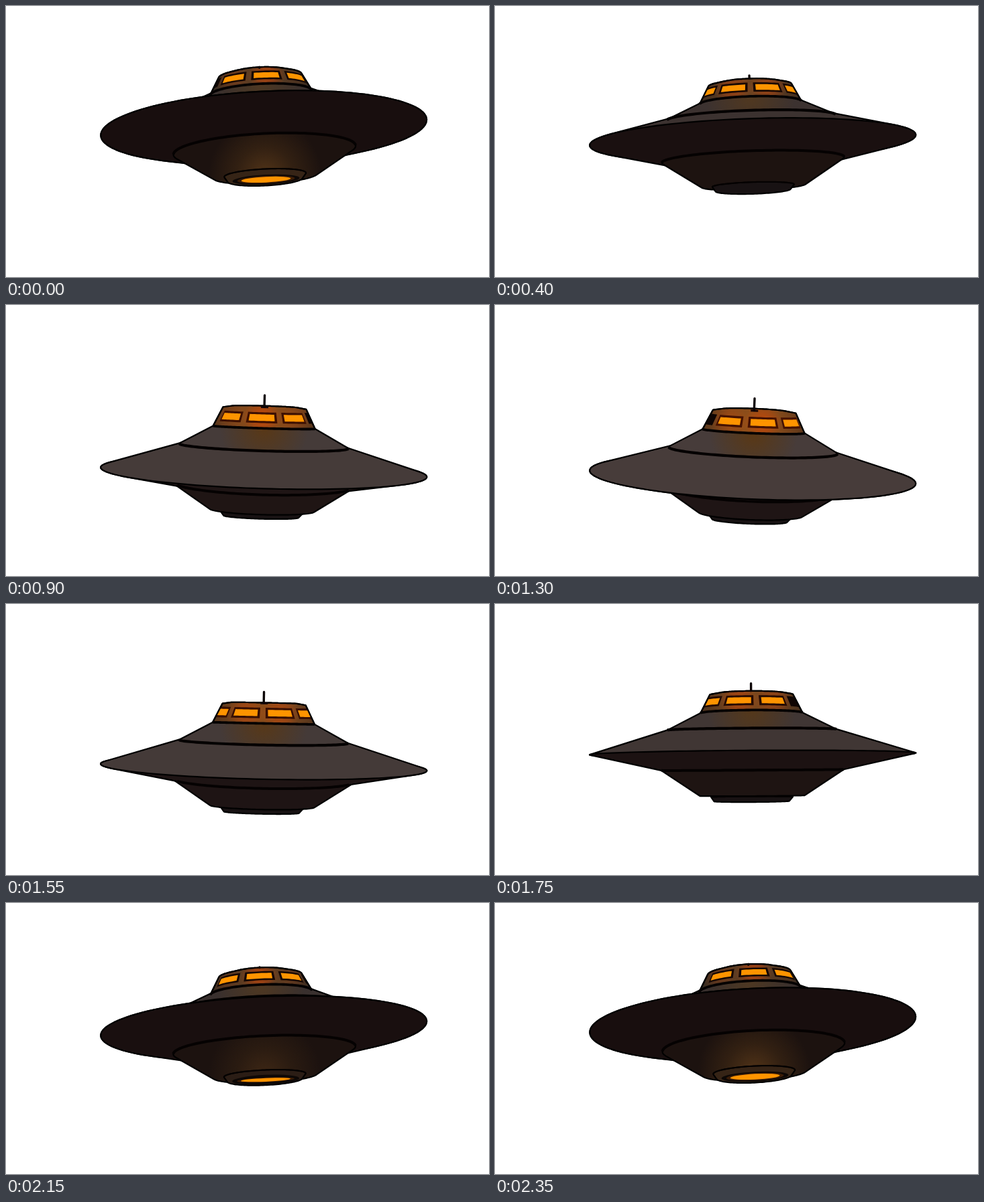
Animation of 720x405 px, one loop 2400 ms. Source, as an HTML page with a canvas:

```html
<!DOCTYPE html>
<html lang="en">
<head>
<meta charset="utf-8">
<title>Flying saucer</title>
<style>
html, body { margin: 0; width: 100%; height: 100%; overflow: hidden; background: #fff; }
canvas { display: block; width: 720px; height: 405px; }
</style>
</head>
<body>
<canvas id="stage" width="720" height="405"></canvas>
<script>
const ctx = document.getElementById('stage').getContext('2d');
const LOOP = 2400, STEP = 50, LEAD = 15, RAD = Math.PI / 180;
const SPACING = 45;

// radius, height and its change, depth (near side, down) and its change, x shift
const RINGS = {
  cap:        [49, 79.5, 20.5, -11, 14, -1.5],
  domeTop:    [62, 77, 21, -12, 15, -1.5],
  domeBase:   [76, 51.5, 17.5, -14, 17.5, -1.5],
  shoulder:   [126, 31.5, 8.5, -18, 28.5, -1],
  rim:        [243.2, 0, 0, -54, 88.5, 0],
  hull:       [136, -34, 18, -25, 46, -.5],
  hullBase:   [78, -72, 17, -12, 21, -1],
  flange:     [61, -71, 12, -9, 15, -1.5],
  flangeBase: [56, -78, 13, -9, 14, -2]
};

const mix = (a, b, k) => 'rgb(' + a.map((v, i) => Math.round(v + (b[i] - v) * k)) + ')';

// 0 = seen from below, 1 = seen from above
function swing(t) {
  const u = -Math.cos(2 * Math.PI * (t + LEAD) / LOOP);
  return .5 + .5 * (u + .12 * (u - u ** 3));
}

function ringsAt(s) {
  const out = {};
  for (const name in RINGS) {
    const [r, h, dh, b, db, x] = RINGS[name];
    out[name] = { r, x, y: -h - dh * s, b: b + db * s };
  }
  return out;
}

const at = (ring, a) => [ring.x + ring.r * Math.sin(a), ring.y + ring.b * Math.cos(a)];

function blend(p, q, v) {
  const o = {};
  for (const k in p) o[k] = p[k] + (q[k] - p[k]) * v;
  return o;
}

function arcPoints(ring, from, to, n) {
  return Array.from({ length: n + 1 }, (_, i) => at(ring, (from + (to - from) * i / n) * RAD));
}

function convex(pts) {
  pts.sort((p, q) => p[0] - q[0] || p[1] - q[1]);
  const half = list => {
    const h = [];
    for (const p of list) {
      while (h.length > 1) {
        const a = h[h.length - 2], b = h[h.length - 1];
        if ((b[0] - a[0]) * (p[1] - a[1]) - (b[1] - a[1]) * (p[0] - a[0]) > 0) break;
        h.pop();
      }
      h.push(p);
    }
    return h.slice(0, -1);
  };
  return [...half(pts), ...half(pts.slice().reverse())];
}

function trace(pts, closed) {
  ctx.beginPath();
  pts.forEach(p => ctx.lineTo(p[0], p[1]));
  if (closed) ctx.closePath();
}

function outline() {
  ctx.strokeStyle = '#000';
  ctx.lineWidth = 2.2;
  ctx.stroke();
}

function solid(fill, ...rings) {
  const pts = convex(rings.flatMap(r => arcPoints(r, 0, 360, 120)));
  trace(pts, true);
  ctx.fillStyle = fill;
  ctx.fill();
  outline();
  return pts;
}

function nearLine(ring, width, reach = 88) {
  trace(arcPoints(ring, -reach, reach, 60));
  ctx.strokeStyle = '#050202';
  ctx.lineWidth = width;
  ctx.stroke();
}

function radial(x, y, r, ...stops) {
  const g = ctx.createRadialGradient(x, y, 0, x, y, r);
  stops.forEach((c, i) => g.addColorStop(i / (stops.length - 1), c));
  return g;
}

function pane(R, a, half, low, high, fill) {
  const from = Math.max(a - half, -84), to = Math.min(a + half, 84);
  if (from >= to) return;
  const edge = v => arcPoints(blend(R.domeBase, R.domeTop, v), from, to, 10);
  trace([...edge(low), ...edge(high).reverse()], true);
  ctx.fillStyle = fill;
  ctx.fill();
}

function dome(R, s, t) {
  const band = blend(R.domeBase, R.domeTop, .55);
  const [cx, cy] = at(band, 0);
  const shape = solid(radial(cx, cy, 76, mix([96, 64, 36], [150, 80, 24], s),
    mix([78, 56, 36], [132, 74, 27], s), mix([52, 42, 33], [88, 54, 28], s)),
    R.domeBase, R.domeTop, R.cap);
  ctx.save();
  ctx.clip();
  const turn = 8 + 2 * SPACING * t / LOOP % SPACING;
  const angles = [-2, -1, 0, 1].map(k => turn + SPACING * k);
  for (const a of angles) {
    const [x, y] = at(band, a * RAD);
    ctx.globalAlpha = Math.cos(a * RAD) ** 4;
    ctx.fillStyle = radial(x, y, 28, 'rgba(235,75,0,.6)', 'rgba(225,65,0,.35)', 'rgba(220,70,0,0)');
    ctx.fillRect(x - 30, y - 30, 60, 60);
  }
  ctx.globalAlpha = 1;
  for (const a of angles) {
    const lit = Math.abs(a) < 70;
    pane(R, a, 19, .27, .83, lit ? mix([22, 8, 4], [72, 18, 2], s * s) : '#100604');
    if (lit) pane(R, a, 16, .38, .72, '#ff9400');
  }
  ctx.restore();
  trace(shape, true);
  outline();
}

function upper(R, s, t) {
  const top = mix([56, 47, 45], [71, 60, 58], s);
  const [gx, gy] = at(R.domeBase, 0);
  const parts = [
    () => solid(top, R.rim, R.shoulder),
    () => solid(radial(gx, gy, 66, mix([78, 56, 34], [90, 56, 20], s), top), R.shoulder, R.domeBase),
    () => dome(R, s, t)
  ];
  if (R.rim.b < 0) parts.reverse();
  parts.forEach(draw => draw());
  nearLine(R.shoulder, 4.2);
  nearLine(R.domeBase, 3.8);
}

function lower(R, s, light) {
  const under = mix([24, 14, 14], [32, 22, 22], s);
  const hull = mix([28, 18, 15], [31, 21, 21], s);
  const lit = radial(R.flange.x, R.flange.y, 84, mix([28, 18, 15], [82, 52, 24], light),
    mix([28, 18, 15], [50, 32, 18], light), hull);
  const parts = [
    () => solid(under, R.rim, R.hull),
    () => solid(light > 0 ? lit : hull, R.hull, R.hullBase),
    () => solid(mix([24, 18, 19], [54, 36, 22], light), R.flange, R.flangeBase)
  ];
  if (R.rim.b > 0) parts.reverse();
  parts.forEach(draw => draw());
  if (R.rim.b < 0) nearLine(R.flange, 1.8);
  nearLine(R.hull, 4, R.rim.b < 0 ? 88 : 70);
}

function disc(ring, r, b, fill) {
  ctx.beginPath();
  ctx.ellipse(ring.x + 1.5, ring.y, r, b, 0, 0, 2 * Math.PI);
  ctx.fillStyle = fill;
  ctx.fill();
}

function antenna(R, s) {
  const tip = -91 - 28.5 * s, foot = R.cap.y - Math.max(0, -R.cap.b);
  if (tip >= foot) return;
  ctx.strokeStyle = '#0c0507';
  ctx.lineCap = 'round';
  ctx.lineWidth = 3.4;
  trace([[-2, tip + 1.5], [-2, foot]]);
  ctx.stroke();
  ctx.lineCap = 'butt';
}

function draw(t) {
  const s = swing(t), R = ringsAt(s);
  const light = Math.max(0, 1 - s / .2);
  const roll = Math.atan((-24.5 + 31.5 * s + 14 * s * s) / 487);
  ctx.setTransform(1, 0, 0, 1, 0, 0);
  ctx.clearRect(0, 0, 720, 405);
  ctx.translate(384.2, 181.5 + 77 * s);
  ctx.rotate(roll);
  ctx.lineJoin = 'round';

  if (R.rim.b > 0) {
    lower(R, s, light);
    upper(R, s, t);
    ctx.fillStyle = '#120406';
    ctx.fillRect(-7, R.cap.y - 1, 11, 3);
  } else {
    upper(R, s, t);
    lower(R, s, light);
  }
  antenna(R, s);

  if (light > 0) {
    disc(R.flangeBase, 50, 7.4, '#0d0806');
    disc(R.flangeBase, 43, 5.6 * light, '#3b1c06');
    disc(R.flangeBase, 37, 4.2 * light, '#ff9400');
  }
}

function tick() {
  draw(Math.floor(performance.now() % LOOP / STEP) * STEP);
  requestAnimationFrame(tick);
}
tick();
</script>
</body>
</html>
```
